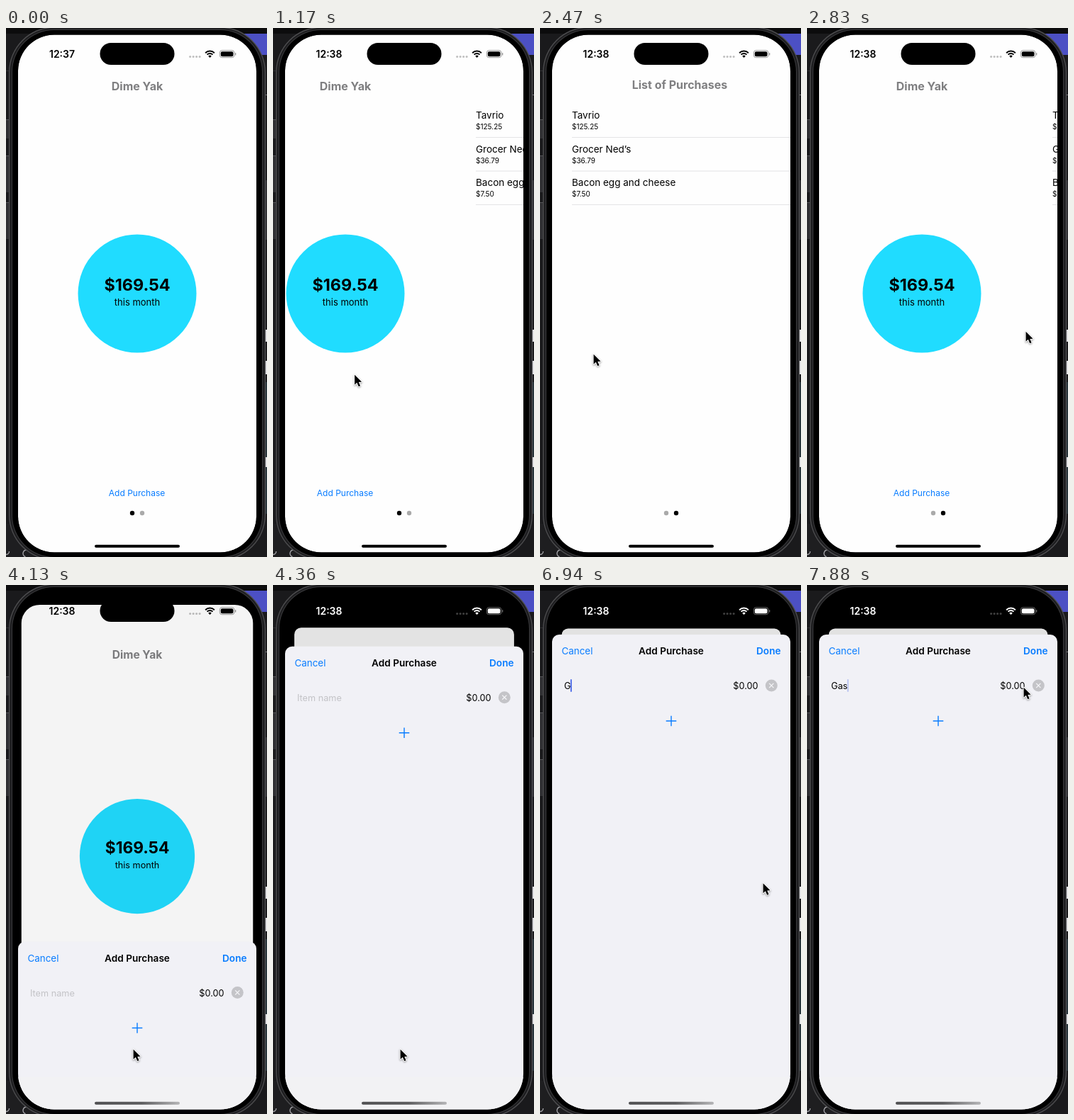
An HTML page with a canvas for the animation above (8 s loop, 368 px wide and 747 px high).

```html
<!DOCTYPE html>
<html lang="en">
<head>
<meta charset="utf-8">
<title>Purchase tracker</title>
<style>
  html, body { margin: 0; width: 100%; height: 100%; overflow: hidden; background: #000; }
  canvas { display: block; width: 368px; height: 747px; }
</style>
</head>
<body>
<canvas id="stage"></canvas>
<script>
const W = 368, H = 747, LOOP = 8000, TICKS = 68;
const SCREEN = { x: 17, y: 9.5, w: 336, h: 731, r: 51 };
const BLUE = '#087cff';
const FONT = 'Inter, "Liberation Sans", sans-serif';
const SHEET_TOP = 70, SHEET_TRAVEL = SCREEN.y + SCREEN.h - SHEET_TOP;

const canvas = document.getElementById('stage');
const ctx = canvas.getContext('2d');
const dpr = window.devicePixelRatio || 1;
canvas.width = W * dpr;
canvas.height = H * dpr;

// Keys: [tick, values...], linear in between
const POINTER = [
  [0, 190, -30], [1, 190, -8], [2, 172, 150], [3, 184, 390], [4, 195, 508], [5, 196, 521],
  [6, 196, 521], [8, 172, 512], [12, 57, 466], [13, 55, 464], [18, 57, 463], [20, 57, 463],
  [21, 75, 460], [22, 185, 446], [23, 295, 431], [24, 308, 428], [25, 285, 490], [26, 225, 590],
  [27, 197, 619], [30, 184, 643], [32, 179, 655], [37, 179, 655], [38, 177, 600], [39, 165, 400],
  [40, 140, 225], [41, 114, 141], [42, 92, 138], [44, 76, 137], [46, 76, 137], [47, 90, 146],
  [49, 238, 247], [51, 268, 450], [53, 272, 541], [57, 272, 541], [61, 356, 300], [64, 313, 156],
  [67, 305, 144]
];
const SCROLL = [
  [6, 0], [8, 25], [12, 141], [13, 226], [14, 291], [15, 321], [16, 331], [17, 335], [18, 336],
  [20, 336], [21, 324], [22, 235], [23, 100], [24, 23], [25, 8], [26, 2], [27, 0]
];
const CARET = [[46, 0], [47, 1], [54, 1], [56, 0], [57, 0], [58, 1], [65, 1], [67, 0.35]];

const lerp = (a, b, p) => a + (b - a) * p;

function track(keys, n) {
  if (n <= keys[0][0]) return keys[0].slice(1);
  const i = keys.findIndex(k => k[0] >= n);
  if (i < 0) return keys[keys.length - 1].slice(1);
  const a = keys[i - 1], b = keys[i];
  const p = (n - a[0]) / (b[0] - a[0]);
  return a.slice(1).map((v, j) => lerp(v, b[j + 1], p));
}

function rect(x, y, w, h, color) {
  ctx.fillStyle = color;
  ctx.fillRect(x, y, w, h);
}

function roundPath(x, y, w, h, r) {
  ctx.beginPath();
  ctx.roundRect(x, y, w, h, r);
}

function round(x, y, w, h, r, color) {
  roundPath(x, y, w, h, r);
  ctx.fillStyle = color;
  ctx.fill();
}

function disc(x, y, r, color) {
  ctx.beginPath();
  ctx.arc(x, y, r, 0, Math.PI * 2);
  ctx.fillStyle = color;
  ctx.fill();
}

function lines(color, width, ...segs) {
  ctx.strokeStyle = color;
  ctx.lineWidth = width;
  ctx.beginPath();
  for (const [x1, y1, x2, y2] of segs) {
    ctx.moveTo(x1, y1);
    ctx.lineTo(x2, y2);
  }
  ctx.stroke();
}

function text(str, x, y, size, color, weight = 400, align = 'left') {
  ctx.font = `${weight} ${size}px ${FONT}`;
  ctx.textAlign = align;
  ctx.fillStyle = color;
  ctx.fillText(str, x, y);
}

function drawDesktop() {
  rect(0, 0, W, H, '#1a1a1c');
  rect(0, 0, W, 8, '#0c0c0d');
  rect(300, 8, 68, 30, '#4c50c4');
  rect(0, 60, 12, 1, '#303032');
  rect(362, 94, 6, 1, '#77777a');
  rect(0, 700, 40, 47, '#1e1e20');
  rect(364, 500, 4, 186, '#28353b');
  for (const [y, h] of [[426, 17], [470, 19], [606, 14]]) rect(364, y, 4, h, '#dedee0');
  ctx.strokeStyle = '#a0a0a4';
  ctx.lineWidth = 1.4;
  ctx.beginPath();
  ctx.arc(0, 739, 4.5, 0, Math.PI);
  ctx.stroke();
  ctx.beginPath();
  ctx.arc(29, 742, 5, Math.PI * 0.6, Math.PI * 1.5);
  ctx.stroke();
}

function drawPhone() {
  for (const [y, h] of [[129, 27], [180, 52], [246, 52]]) {
    rect(0, y, 6, h, '#303033');
    rect(0, y, 6, 1, '#555558');
  }
  rect(362, 215, 6, 84, '#303033');
  round(4, -1.5, 362, 753, 64, '#505052');
  round(5.2, -0.3, 359.6, 750.6, 63, '#1e1e20');
  round(8, 2, 354, 746, 60, '#3a3a3c');
  round(9, 3, 352, 744, 59, '#000');
}

function drawSummary() {
  text('Dime Yak', 185, 88, 16, '#7f7f81', 700, 'center');
  disc(185, 375, 83.5, '#20dcff');
  text('$169.54', 185, 371, 23.4, '#000', 700, 'center');
  text('this month', 185, 392, 13, '#000', 400, 'center');
  text('Add Purchase', 184.5, 661, 12, BLUE, 400, 'center');
}

function drawList() {
  text('List of Purchases', 185, 85.5, 16, '#7f7f81', 700, 'center');
  const rows = [['Tavrio', '$125.25'], ['Grocer Ned’s', '$36.79'], ['Bacon egg and cheese', '$7.50']];
  rows.forEach(([name, price], i) => {
    const y = 128 + i * 47.5;
    text(name, 33, y, 13.5, '#000');
    text(price, 33, y + 15, 10, '#000');
    rect(33, y + 26, 320, 1, '#e4e4e6');
  });
}

function drawPages(scroll, second, p) {
  const s = 1 - 0.08 * p;
  ctx.save();
  ctx.translate(185, lerp(SCREEN.y, 61.5, p));
  ctx.scale(s, s);
  ctx.translate(-185, -SCREEN.y);
  roundPath(SCREEN.x, SCREEN.y, SCREEN.w, SCREEN.h, lerp(SCREEN.r, 10, Math.sqrt(p)));
  ctx.clip();
  rect(0, 0, W, H, '#fefefe');
  ctx.save();
  ctx.translate(-scroll, 0);
  drawSummary();
  ctx.translate(SCREEN.w, 0);
  drawList();
  ctx.restore();
  disc(178, 685, 3.2, second ? '#aaa' : '#000');
  disc(192, 685, 3.2, second ? '#000' : '#aaa');
  if (p > 0) rect(0, 0, W, H, `rgba(0,0,0,${0.11 * p})`);
  ctx.restore();
}

function drawSheet(top, typed, caret) {
  round(SCREEN.x, top, SCREEN.w, SCREEN.h, 10, '#f1f1f6');
  rect(SCREEN.x, Math.max(top + 40, 695), SCREEN.w, 60, '#f2f2f4');
  text('Cancel', 30.5, top + 28, 13.4, BLUE);
  text('Add Purchase', 185, top + 28, 13.6, '#000', 600, 'center');
  text('Done', 339.5, top + 28, 13.6, BLUE, 600, 'right');
  text('$0.00', 307.5, top + 77, 12.7, '#000', 400, 'right');
  text(typed || 'Item name', 34, top + 77, 12.7, typed ? '#000' : '#c3c3c7');
  if (caret > 0) {
    const x = 33.5 + (typed ? ctx.measureText(typed).width : 0);
    ctx.globalAlpha = caret;
    round(x, top + 63, 1.8, 18, 0.9, '#4565e8');
    ctx.globalAlpha = 1;
  }
  const y = top + 72;
  disc(326.3, y, 8.5, '#c4c4c8');
  lines('#f5f5f8', 1.3, [323.2, y - 3.1, 329.4, y + 3.1], [329.4, y - 3.1, 323.2, y + 3.1]);
  lines(BLUE, 1.4, [177.7, top + 122, 192.3, top + 122], [185, top + 114.7, 185, top + 129.3]);
}

function drawStatus(clock, color) {
  text(clock, 79, 42, 14, color, 600, 'center');
  ctx.globalAlpha = 0.25;
  for (let i = 0; i < 4; i++) disc(259.6 + i * 4.5, 40.6, 1.5, color);
  ctx.globalAlpha = 1;

  // Wi-Fi
  ctx.strokeStyle = color;
  ctx.lineWidth = 2;
  for (const r of [9, 5.6]) {
    ctx.beginPath();
    ctx.arc(287.5, 41.6, r, -Math.PI * 0.75, -Math.PI * 0.25);
    ctx.stroke();
  }
  ctx.beginPath();
  ctx.moveTo(287.5, 42);
  ctx.arc(287.5, 42, 3.2, -Math.PI * 0.75, -Math.PI * 0.25);
  ctx.fillStyle = color;
  ctx.fill();

  // Battery
  ctx.globalAlpha = 0.4;
  ctx.lineWidth = 1;
  roundPath(301.3, 31.7, 20.6, 10, 3.2);
  ctx.stroke();
  round(323, 35, 1.3, 3.6, 0.6, color);
  ctx.globalAlpha = 1;
  round(302.8, 33.2, 17.6, 7, 2, color);
}

function drawHomeBar(onSheet) {
  let color = '#000';
  if (onSheet) {
    color = ctx.createLinearGradient(125, 0, 245, 0);
    color.addColorStop(0, '#505052');
    color.addColorStop(0.55, '#5c5c5e');
    color.addColorStop(1, '#b4b4b6');
  }
  round(125, 729.8, 120, 4, 2, color);
}

function drawPointer(x, y) {
  ctx.save();
  ctx.translate(x + 0.6, y + 0.8);
  ctx.beginPath();
  const arrow = [[0, 0], [0, 14], [3.2, 11], [5.6, 16.4], [8, 15.4], [5.7, 10.1], [10, 10]];
  arrow.forEach(([px, py]) => ctx.lineTo(px, py));
  ctx.closePath();
  ctx.lineJoin = 'round';
  ctx.lineWidth = 2;
  ctx.strokeStyle = '#fff';
  ctx.shadowColor = 'rgba(0,0,0,.4)';
  ctx.shadowBlur = 2.5 * dpr;
  ctx.shadowOffsetY = dpr;
  ctx.stroke();
  ctx.shadowColor = 'transparent';
  ctx.fillStyle = '#000';
  ctx.fill();
  ctx.restore();
}

// Share of the sheet's way up: critically damped spring
function sheetProgress(ms) {
  const wt = Math.max(0, ms - 4050) * 0.0184;
  return wt > 12 ? 1 : 1 - (1 + wt) * Math.exp(-wt);
}

function draw(n) {
  const p = sheetProgress(n * LOOP / TICKS);
  const typed = 'Gas'.slice(0, Math.max(0, Math.ceil((n - 57) / 2)));
  ctx.setTransform(dpr, 0, 0, dpr, 0, 0);
  drawDesktop();
  drawPhone();
  ctx.save();
  roundPath(SCREEN.x, SCREEN.y, SCREEN.w, SCREEN.h, SCREEN.r);
  ctx.clip();
  drawPages(track(SCROLL, n)[0], n >= 18 && n < 27, p);
  if (p > 0) drawSheet(SHEET_TOP + SHEET_TRAVEL * (1 - p), typed, track(CARET, n)[0]);
  drawStatus(n < 2 ? '12:37' : '12:38', p > 0.5 ? '#fff' : '#000');
  drawHomeBar(p > 0);
  ctx.restore();
  round(132.5, 21, 105, 31, 15.5, '#000');
  drawPointer(...track(POINTER, n));
}

// The screen refreshes in even ticks
function loop(now) {
  const t = now % LOOP;
  draw(Math.min(TICKS - 1, Math.floor(t / LOOP * TICKS + 0.08)));
  requestAnimationFrame(loop);
}
requestAnimationFrame(loop);
</script>
</body>
</html>
```
